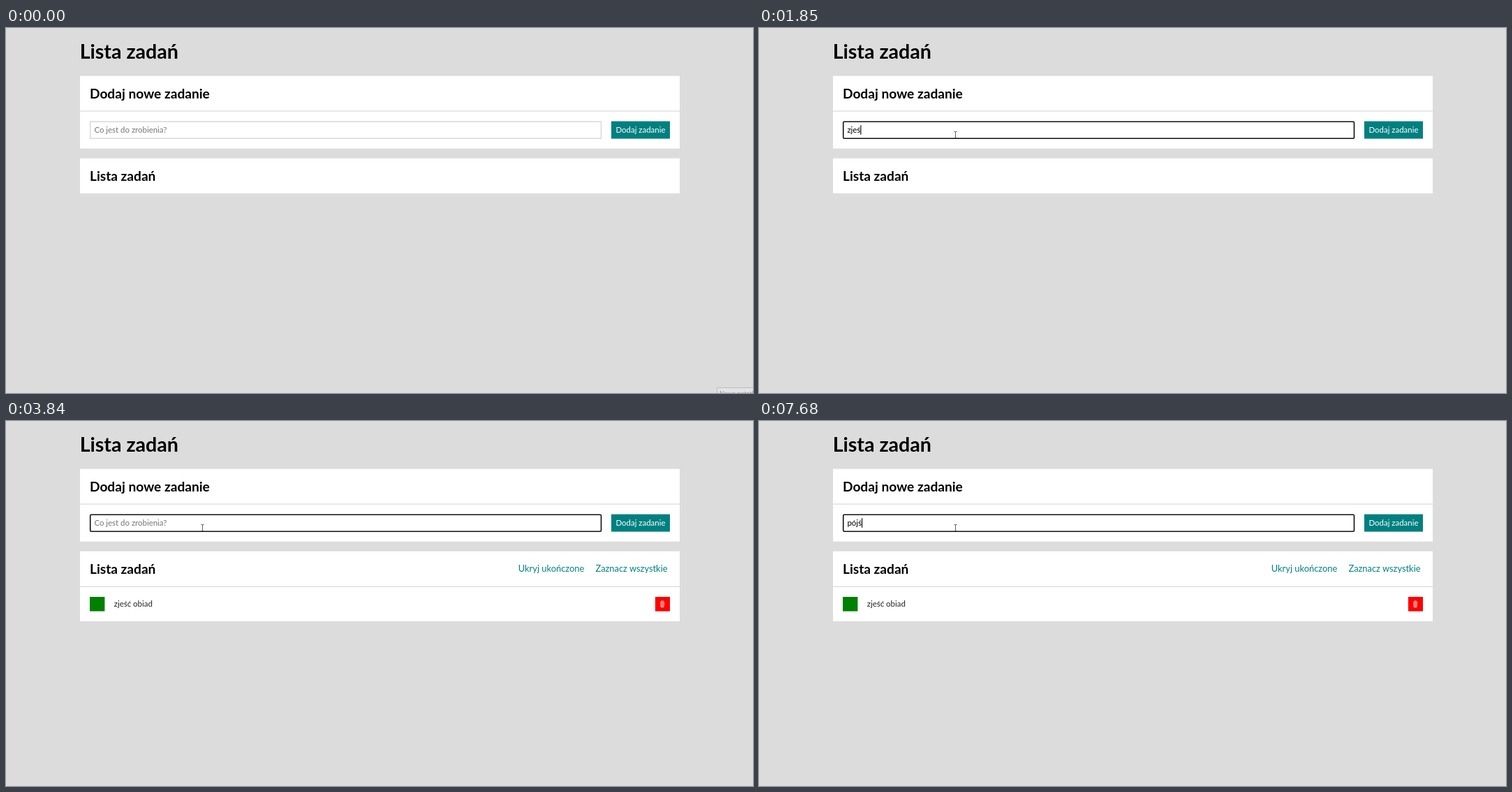
Recreate the animation shown at these times as an HTML page. Size 1070x523 px, loop 8000 ms.

```html
<!DOCTYPE html>
<html lang="pl">
<head>
<meta charset="utf-8">
<title>Lista zadań</title>
<style>
  html, body { margin: 0; width: 100%; height: 100%; overflow: hidden; background: #dcdcdc; }
  svg { display: block; width: 1070px; height: 523px; }
  text { font: 11.45px Lato, sans-serif; white-space: pre; }
  .title { font-size: 28.6px; font-weight: 700; }
  .heading { font-size: 19.1px; font-weight: 700; }
  .link { font-size: 12.88px; fill: #008080; text-anchor: middle; }
  .panel { fill: #fff; }
  .rule { fill: #dcdcdc; }
  .hint { fill: #757575; }
</style>
</head>
<body>
<svg viewBox="0 0 1070 523">
  <rect width="1070" height="523" fill="#dcdcdc"/>
  <text class="title" x="105.7" y="44.2">Lista zadań</text>

  <rect class="panel" x="106" y="68.7" width="859" height="104"/>
  <text class="heading" x="120" y="100.7">Dodaj nowe zadanie</text>
  <rect class="rule" x="106" y="118.4" width="859" height="1.3"/>
  <rect id="field" x="120.7" y="134.2" width="731.8" height="24" fill="#fff"/>
  <text id="hint" class="hint" x="126.4" y="150.3">Co jest do zrobienia?</text>
  <text id="typed" x="126.4" y="150.3"></text>
  <rect id="caret" y="139.3" width="1.1" height="13.5"/>
  <rect x="867" y="133.6" width="84" height="25" fill="#008080"/>
  <text x="909" y="150.3" fill="#fff" text-anchor="middle">Dodaj zadanie</text>

  <rect class="panel" x="106" y="186.7" width="859" height="50.2"/>
  <text class="heading" x="120" y="218.7">Lista zadań</text>
  <g id="task">
    <rect class="panel" x="106" y="236" width="859" height="51"/>
    <rect class="rule" x="106" y="236.6" width="859" height="1.3"/>
    <text class="link" x="781" y="216.2">Ukryj ukończone</text>
    <text class="link" x="896" y="216.2">Zaznacz wszystkie</text>
    <rect x="120" y="252" width="21.4" height="20.6" fill="#008000"/>
    <text x="154.8" y="266.2" fill="#222">zjeść obiad</text>
    <rect x="930" y="252" width="21" height="20.6" fill="#f00"/>
    <path d="M937.2 259.3h5.8M938.4 258h3.4M937.8 260l.4 6.7h3.8l.4-6.7M939.3 260v6M940.9 260v6"
          fill="none" stroke="#ffd9d4" stroke-width=".9"/>
  </g>

  <g id="tooltip">
    <rect x="1018.5" y="515.5" width="60" height="20" fill="#e3e3e3" stroke="#bdbdbd"/>
    <text x="1022" y="527" fill="#999" style="font-size:9px">Nowa notatka</text>
  </g>

  <g id="pointer">
    <circle id="press" cx="-1" cy="-.6" r="6.6" fill="#fffb78"/>
    <path id="beam" d="M-2.2-4.6h1.6l.6.5.6-.5h1.6M0-4.2v8.6M-2.2 4.9h1.6l.6-.5.6.5h1.6"
          fill="none" stroke="#333" stroke-width=".8"/>
    <path id="arrow" d="M0 0v11.5l2.7-2.5 1.7 4 1.7-.7-1.7-3.9h3.6z"
          fill="#fff" stroke="#111" stroke-width=".7"/>
  </g>
</svg>
<script>
const LOOP = 8000, TICK = 66, BLINK = 530;
const FOCUS = 670, RELEASE = 760, SUBMIT = 3840;
const TEXT_X = 126.4;

const typing = [
  { text: 'zjeść obiad', times: [1320, 1450, 1520, 1850, 2110, 2310, 2580, 2850, 2920, 3060, 3240], end: SUBMIT },
  { text: 'pójś', times: [6360, 7020, 7350, 7680], end: LOOP }
];
// time, x, y
const route = [[70, 1012, 508], [270, 700, 300], [430, 370, 165], [600, 281.5, 153]];

const [field, hint, typed, caret, task, tooltip, pointer, press, beam, arrow] =
  ['field', 'hint', 'typed', 'caret', 'task', 'tooltip', 'pointer', 'press', 'beam', 'arrow']
    .map(id => document.getElementById(id));

const show = (el, on) => el.setAttribute('visibility', on ? 'visible' : 'hidden');
const set = (el, attrs) => Object.entries(attrs).forEach(([k, v]) => el.setAttribute(k, v));

function pointerAt(t) {
  const time = 70 + Math.floor((t - 70) / TICK) * TICK;
  const i = route.findIndex(p => p[0] > time);
  if (i < 0) return route.at(-1).slice(1);
  const [t0, x0, y0] = route[Math.max(i - 1, 0)], [t1, x1, y1] = route[i];
  const k = t1 > t0 ? (time - t0) / (t1 - t0) : 0;
  return [x0 + (x1 - x0) * k, y0 + (y1 - y0) * k];
}

function typedAt(t) {
  const entry = typing.find(e => t >= e.times[0] && t < e.end);
  return entry ? entry.text.slice(0, entry.times.filter(m => m <= t).length) : '';
}

function caretOn(t) {
  if (t < FOCUS) return false;
  if (t >= 3770 && t < 6360) {
    return (t >= 4310 && t < 4840) || (t >= 5300 && t < 5830);
  }
  const starts = [FOCUS, ...typing.flatMap(e => e.times)].filter(m => m <= t);
  return t - starts.at(-1) < (t < 1320 ? 520 : BLINK);
}

function draw(t) {
  const focused = t >= FOCUS;
  set(field, {
    stroke: focused ? '#101010' : '#d6d6d6',
    'stroke-width': focused ? 1.6 : 1.4,
    rx: focused ? 1.5 : 0
  });

  const value = typedAt(t);
  if (typed.textContent !== value) typed.textContent = value;
  show(hint, !value);
  show(caret, caretOn(t));
  set(caret, { x: TEXT_X + (value ? typed.getComputedTextLength() : 0) });
  show(task, t >= SUBMIT);
  show(tooltip, t < 130);

  const [x, y] = pointerAt(t);
  const entered = t >= 70;
  const overField = x > 120 && x < 853 && y > 133 && y < 159;
  set(pointer, { transform: `translate(${x} ${y})` });
  show(press, t >= 600 && t < RELEASE);
  show(beam, entered && overField);
  show(arrow, entered && !overField);
}

const start = performance.now();
function frame() {
  draw((performance.now() - start) % LOOP);
  requestAnimationFrame(frame);
}
frame();
</script>
</body>
</html>
```
